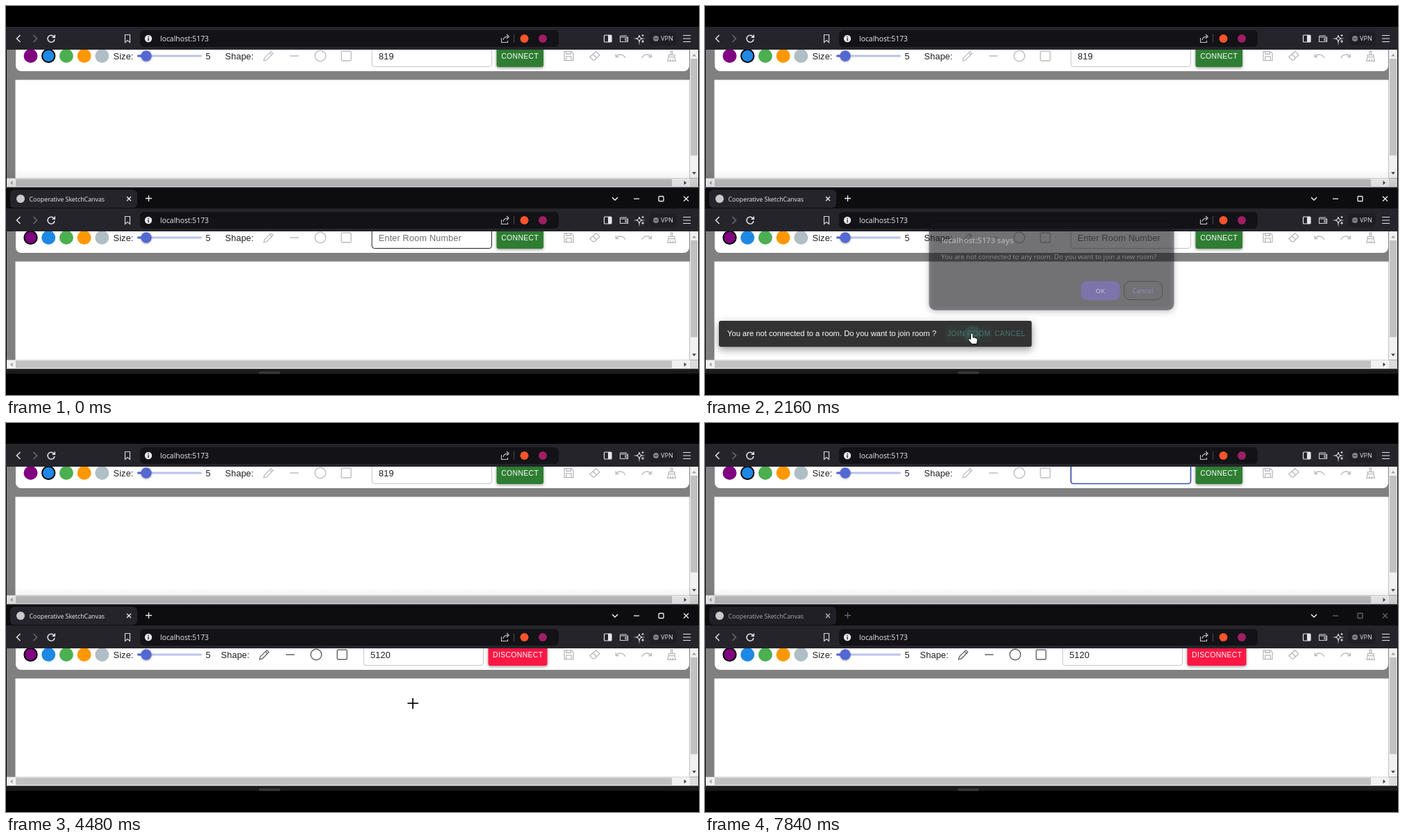
Animation of 998x561 px, one loop 8000 ms. Source, as an HTML page with a canvas:

```html
<!DOCTYPE html>
<html lang="en">
<head>
<meta charset="utf-8">
<title>Shared drawing board</title>
<style>
html, body { margin: 0; width: 100%; height: 100%; overflow: hidden; background: #000; }
canvas { display: block; }
</style>
</head>
<body>
<canvas id="stage" width="998" height="561"></canvas>
<script>
const ctx = document.getElementById('stage').getContext('2d');
const LOOP = 8000, STEP = 80, PANE = 262;
const UI = '"Open Sans", "Noto Sans", sans-serif';
const APP = '"Liberation Sans", Arial, sans-serif';
const SWATCHES = ['#800080', '#1e88e5', '#4caf50', '#ff9800', '#b0bec5'];

const ICONS = {
  pencil: 'M2.5 21.5l1.3-5.3L17 3l4 4L7.800 20.200zM14.300 5.700l4 4',
  save: 'M3 3h14l4 4v14H3zM7 3v5h9V3M7 21v-8h10v8',
  eraser: 'M14.500 3l7 7-10 10H8l-6-6zM8.500 9l7 7',
  undo: 'M2.500 8v6h6M3 13.500C8 7 17.500 7.500 21.500 16',
  redo: 'M21.500 8v6h-6M21 13.500C16 7 6.500 7.500 2.500 16',
  brush: 'M10.500 2h3v8h-3zM6 10h12v4H6zM6 14l-2 8h16l-2-8M9.500 22v-4M14.500 22v-4'
};
const POINTERS = {
  arrow: 'M0 0v11.500l2.700-2.500 2 4.300 1.900-.900-2-4.200h3.700z',
  hand: 'M-1 1.200q1.300-1.800 2.500 0v5l3 .6q3.500.5 3.500 3l-1 5.200H.500L-4.500 9.500q0-2 3.500-.5z'
};

const clamp = v => Math.max(0, Math.min(1, v));
const ramp = (t, a, b) => clamp((t - a) / (b - a));
const mix = (a, b, p) => a + (b - a) * p;

function rect(x, y, w, h, color, r = 0, stroke, width = 1) {
  ctx.beginPath();
  ctx.roundRect(x, y, w, h, r);
  if (color) { ctx.fillStyle = color; ctx.fill(); }
  if (stroke) { ctx.strokeStyle = stroke; ctx.lineWidth = width; ctx.stroke(); }
}

function disc(x, y, r, color, stroke, width = 1) {
  rect(x - r, y - r, 2 * r, 2 * r, color, r, stroke, width);
}

function line(d, color, width = 1.2, x = 0, y = 0, scale = 1) {
  ctx.save();
  ctx.translate(x, y);
  ctx.scale(scale, scale);
  ctx.strokeStyle = color;
  ctx.lineWidth = width / scale;
  ctx.stroke(new Path2D(d));
  ctx.restore();
}

function fillPath(d, color) {
  ctx.fillStyle = color;
  ctx.fill(new Path2D(d));
}

function text(s, x, y, size, color, family = APP, { weight = 400, spacing = 0, align = 'left' } = {}) {
  ctx.font = `${weight} ${size}px ${family}`;
  ctx.letterSpacing = spacing + 'px';
  ctx.textAlign = align;
  ctx.fillStyle = color;
  ctx.fillText(s, x, y);
}

function shadow(blur, dy, alpha) {
  ctx.shadowColor = `rgba(0,0,0,${alpha})`;
  ctx.shadowBlur = blur;
  ctx.shadowOffsetY = dy;
}

function icon(name, x, color) {
  line(ICONS[name], color, 1.3, x - 8.6, 63.500, 0.72);
}

function navBar() {
  rect(0, 30, 998, 33, '#25242b');
  rect(193, 35, 603, 24, '#131217', 6);
  line('M20.500 42l-5 5 5 5', '#e6e6ea', 1.5);
  line('M39.500 42l5 5-5 5', '#6c6b73', 1.5);
  line('M69.300 44.500a5 5 0 1 0 .7 3.500M70.300 41.500v3.700h-3.700', '#e6e6ea', 1.5);
  line('M171.500 41.500h7v11l-3.500-3-3.500 3z', '#d6d5dc');
  disc(205, 47, 5.200, '#e8e8ec');
  rect(204.4, 46.200, 1.3, 4, '#131217');
  rect(204.4, 43.800, 1.3, 1.4, '#131217');
  text('localhost:5173', 222, 51, 10.4, '#ededf1', UI);
  line('M713.500 46v6.500h9V50M716 49q1-5 7-5M721 41l3.200 3-3.200 3', '#c9c8d0', 1.1);
  rect(731, 41, 1, 12, '#4b4a52');
  disc(746.500, 47, 6, '#fb542b');
  disc(773, 47, 6, '#9e1f63');
  rect(861.500, 42, 10.500, 10, null, 1, '#e6e6ea', 1.2);
  rect(867, 42, 5, 10, '#e6e6ea');
  line('M894 43h-8.500q-1 0-1 1v7.500h11V45h-10M892 47h3.500v2.500H892z', '#d6d5dc', 1.1);
  line('M912 42q.5 4.500 4.500 5-4 .5-4.500 5-.5-4.500-4.500-5 4-.5 4.500-5M917 49v4M915 51h4M917 41v3M915.500 42.500h3', '#e6e6ea', 1.1);
  rect(926, 37, 40, 20, '#1f1e25', 6);
  disc(936, 47, 4, '#86858d');
  rect(933.500, 46.500, 5, 1, '#25242b');
  text('VPN', 943, 50.200, 9.1, '#e2e2e7', UI);
  line('M975 42.500h11M975 47h11M975 51.500h11', '#e6e6ea', 1.2);
}

function scrollBars() {
  rect(985, 63, 12, 185, '#f1f1f1');
  rect(986, 76, 10, 139.500, '#c1c1c1');
  fillPath('M988 72.500h6l-3-3.500z', '#a0a0a0');
  fillPath('M988 239.500h6l-3 3.500z', '#404040');
  rect(1, 248.500, 984, 12.500, '#f1f1f1');
  rect(985, 248.500, 12, 12.500, '#dcdcdc');
  rect(14, 249.500, 945, 10.500, '#c1c1c1');
  fillPath('M9.500 252v6l-3.500-3z', '#a0a0a0');
  fillPath('M976.500 252v6l3.500-3z', '#404040');
}

function input(x, s) {
  const focus = s.focus;
  rect(x + 0.5, 47, 172.500, 40.500, null, 3.5, focus ? '#3f51b5' : s.hover ? '#212121' : '#c4c4c4', focus ? 1.7 : 1);
  const labelStyle = { spacing: 0.12 };
  if (s.floating) text('Enter Room Number', x + 10.5, 69.500, 11.4, '#757575', APP, labelStyle);
  if (s.value) text(s.value, x + 10.3, 76.500, 12.8, '#212121', APP, labelStyle);
  else if (!focus) text('Enter Room Number', x + 10, 76.500, 12.8, '#6f6f6f', APP, labelStyle);
  if (s.caret) rect(x + 10 + s.value.length * 7.24, 65, 1, 14, '#000');
}

function toolBar(s) {
  rect(14, 50, 970, 44, '#fff', 8);
  SWATCHES.forEach((c, i) => {
    const on = i === s.swatch;
    disc(35.500 + i * 25.7, 72, on ? 9.2 : 10, c, on && '#000', 1.9);
  });
  text('Size:', 154.500, 76.500, 12.8, '#212121', APP, { spacing: 0.12 });
  rect(189, 70.500, 93, 3, '#bac3ee', 1.5);
  rect(189, 70.500, 12, 3, '#5468d4', 1.5);
  ctx.save();
  shadow(3, 1, 0.35);
  disc(202, 72, 7.7, '#5468d4');
  ctx.restore();
  text('5', 287.500, 76.500, 12.8, '#212121', APP);

  const dx = s.connected ? -6 : 0;
  const ink = s.drawable ? '#616161' : '#bdbdbd';
  text('Shape:', 315.500 + dx, 76.500, 12.8, '#212121', APP, { spacing: 0.12 });
  icon('pencil', 378 + dx, ink);
  rect(409 + dx, 71.300, 12.500, 1.5, ink);
  disc(452.700 + dx, 72, 7.8, null, ink, 1.4);
  rect(483 + dx, 65, 14, 14, null, 1.5, ink, 1.4);

  input(s.connected ? 514.500 : 526.500, s);
  ctx.save();
  shadow(4, 1.5, 0.4);
  if (s.connected) rect(694.500, 50, 85, 38, '#ff1744', 3);
  else rect(706.500, 50, 67.500, 38, '#2e7d32', 3);
  ctx.restore();
  text(s.connected ? 'DISCONNECT' : 'CONNECT', s.connected ? 737.200 : 740.200, 75.800, 10.4, '#fff', APP, { spacing: 0.37, align: 'center' });

  const tool = s.tools ? '#616161' : '#b8b8b8';
  icon('save', 810.500, tool);
  icon('eraser', 848, tool);
  icon('undo', 885, tool);
  icon('redo', 922.500, '#b8b8b8');
  icon('brush', 958.500, tool);
}

function pane(offset, s) {
  ctx.save();
  ctx.translate(0, offset);
  navBar();
  ctx.beginPath();
  ctx.rect(1, 63, 996, 198);
  ctx.clip();
  rect(0, 63, 998, 198, '#808080');
  toolBar(s);
  rect(13.500, 106.500, 971, 142, '#fff');
  scrollBars();
  ctx.restore();
}

function tabStrip(active) {
  const ink = active ? '#f0f0f3' : '#66656c';
  rect(0, 261, 998, 1.5, '#55555a');
  rect(0, 262.500, 998, 30, '#0d0d10');
  rect(6, 265, 183, 26, active ? '#25242b' : '#201f25', 6);
  disc(21, 278, 6, '#c9c9cc');
  text('Cooperative SketchCanvas', 33.500, 281.500, 8.85, active ? '#ededf1' : '#a9a8b0', UI);
  line('M174 275l6 6M180 275l-6 6', active ? '#f0f0f3' : '#b9b8c0', 1.3);
  line('M201 277.500h9M205.500 273v9', ink, 1.3);
  line('M873 276l4 4 4-4', '#f0f0f3', 1.5);
  line('M904 278h8', ink, 1.3);
  rect(940, 274.500, 7, 7, null, 1, ink, 1.3);
  line('M976 274.500l7 7M983 274.500l-7 7', ink, 1.3);
}

function snackBar(t) {
  if (t < 960 || t >= 4080) return;
  const p = t < 3000 ? [0.3, 0.75, 1][Math.min(2, (t - 960) / STEP)] : t < 4000 ? 1 : 0.4;
  ctx.save();
  ctx.globalAlpha = p;
  ctx.translate(245, 473);
  ctx.scale(mix(0.75, 1, p), mix(0.56, 1, p));
  ctx.translate(-245, -473);
  ctx.save();
  shadow(12, 4, 0.4);
  rect(20, 454, 450.500, 37.500, '#323232', 3);
  ctx.restore();
  text('You are not connected to a room. Do you want to join room ?', 32, 476.300, 11.2, '#fff');
  if (t >= 1680) rect(346, 460.500, 67, 24.500, t < 2240 ? 'rgba(70,130,115,.08)' : '#39504b', 3);
  if (t >= 2080 && t < 2240) disc(385, 473, t < 2160 ? 8 : 12, 'rgba(70,130,115,.25)');
  text('JOIN ROOM', 349, 476.200, 10.4, '#46796e', APP, { spacing: 0.37 });
  text('CANCEL', 417, 476.200, 10.4, '#46796e', APP, { spacing: 0.37 });
  ctx.restore();
}

function dialogAlpha(t) {
  if (t < 2080 || t >= 4240) return 0;
  return t < 3960 ? [0.2, 0.48, 0.82, 1][Math.min(3, (t - 2080) / STEP)] : [0.92, 0.7, 0.3][(t - 4000) / STEP];
}

function dialog(t) {
  const a = dialogAlpha(t);
  if (!a) return;
  ctx.save();
  ctx.globalAlpha = a;
  ctx.translate(0, -(t < 3000 ? 18 : 26) * (1 - a));
  ctx.save();
  shadow(8, 2, 0.5);
  const grow = Math.min(1.5, 4 * (1 - a));
  rect(324 - grow, 322, 350 + 2 * grow, 126, '#1b1a20', 9);
  ctx.restore();
  text('localhost:5173 says', 340, 351.600, 11.25, '#f2f2f5', UI, { weight: 600 });
  text('You are not connected to any room. Do you want to join a new room?', 340, 374, 9.65, '#e6e6ea', UI);
  if (a === 1) rect(540, 404, 59.500, 31.500, null, 11, '#3e3779', 2);
  rect(541.500, 406, 56, 27.500, t < 2240 ? '#8676e6' : '#6a5ccd', 9);
  text('OK', 569, 423.600, 9.6, '#fff', UI, { weight: 600, align: 'center' });
  rect(603.500, 406.500, 55, 26.500, null, 9, '#302e3c', 1);
  text('Cancel', 630.500, 423.600, 9.5, '#a29cf0', UI, { weight: 600, align: 'center' });
  ctx.restore();
}

// time, x, y
const PATH = [
  [80, 600, 345], [880, 496, 444], [960, 496, 477], [1280, 496, 477], [1440, 462, 472],
  [1760, 384, 472], [2320, 384, 472], [2960, 583, 420], [4320, 583, 420],
  [4720, 590, 381], [5440, 620, 164], [5520, 620, 164], [6000, 610, 74], [6640, 610, 74]
];

function pointerAt(t) {
  const i = PATH.findIndex(k => k[0] > t);
  if (i < 1) return null;
  const [a, b] = [PATH[i - 1], PATH[i]];
  const p = ramp(t, a[0], b[0]);
  return { x: mix(a[1], b[1], p), y: mix(a[2], b[2], p) };
}

function overInput(p, offset, x) {
  const y = p ? p.y - offset : 0;
  return !!p && p.x > x && p.x < x + 173 && y > 63 && y < 88;
}

function pointerKind(t, { x, y }) {
  if (t >= 2240 && t < 4040) return 'arrow';
  if (t >= 960 && t < 4000 && y > 454 && x < 470) return x < 413 ? 'hand' : 'arrow';
  const local = y > 262 ? y - PANE : y;
  if (local > 106 && local < 248) return 'cross';
  return overInput({ x, y: local }, 0, 520) ? 'beam' : 'arrow';
}

function pointer(t, p) {
  if (!p) return;
  const kind = pointerKind(t, p);
  ctx.save();
  ctx.translate(p.x, p.y);
  if (kind === 'cross') {
    const color = dialogAlpha(t) ? '#e6e6a0' : '#000';
    rect(-7.500, -1, 15.500, 1.7, color);
    rect(-0.800, -7.700, 1.7, 15.500, color);
  } else if (kind === 'beam') {
    line('M-2.500-6.500H2.500M0-6.500V6.500M-2.500 6.500H2.500', '#000', 1.1);
  } else {
    line(POINTERS[kind], '#000', 1.6);
    fillPath(POINTERS[kind], '#fff');
  }
  ctx.restore();
}

function draw(t) {
  const p = pointerAt(t);
  const joined = t >= 4080, connected = t >= 4160, focus = t >= 6240;
  ctx.fillStyle = '#000';
  ctx.fillRect(0, 0, 998, 561);

  const left = t < 6720 ? 3 : t < 6960 ? 2 : t < 7200 ? 1 : 0;
  pane(0, {
    swatch: 1, value: '819'.slice(0, left), focus,
    caret: focus && t < 7840, hover: overInput(p, 0, 527)
  });
  const shade = ctx.createLinearGradient(0, 236, 0, 262);
  shade.addColorStop(0, 'rgba(0,0,0,0)');
  shade.addColorStop(1, 'rgba(0,0,0,.1)');
  ctx.fillStyle = shade;
  ctx.fillRect(0, 236, 998, 26);

  tabStrip(!focus);
  pane(PANE, {
    swatch: 0, value: joined ? '5120' : '', connected, drawable: joined,
    tools: joined && !connected, floating: joined && !connected,
    hover: t < 80 || overInput(p, PANE, connected ? 515 : 527)
  });
  rect(0, 523, 998, 1.5, '#4a4a4c');
  rect(0, 524.500, 998, 6, '#1b1b1c');
  rect(364, 527, 31, 3.500, '#38383a', 2);

  snackBar(t);
  dialog(t);
  pointer(t, p);
}

function frame() {
  draw(Math.floor(performance.now() % LOOP / STEP) * STEP);
  requestAnimationFrame(frame);
}
frame();
</script>
</body>
</html>
```
